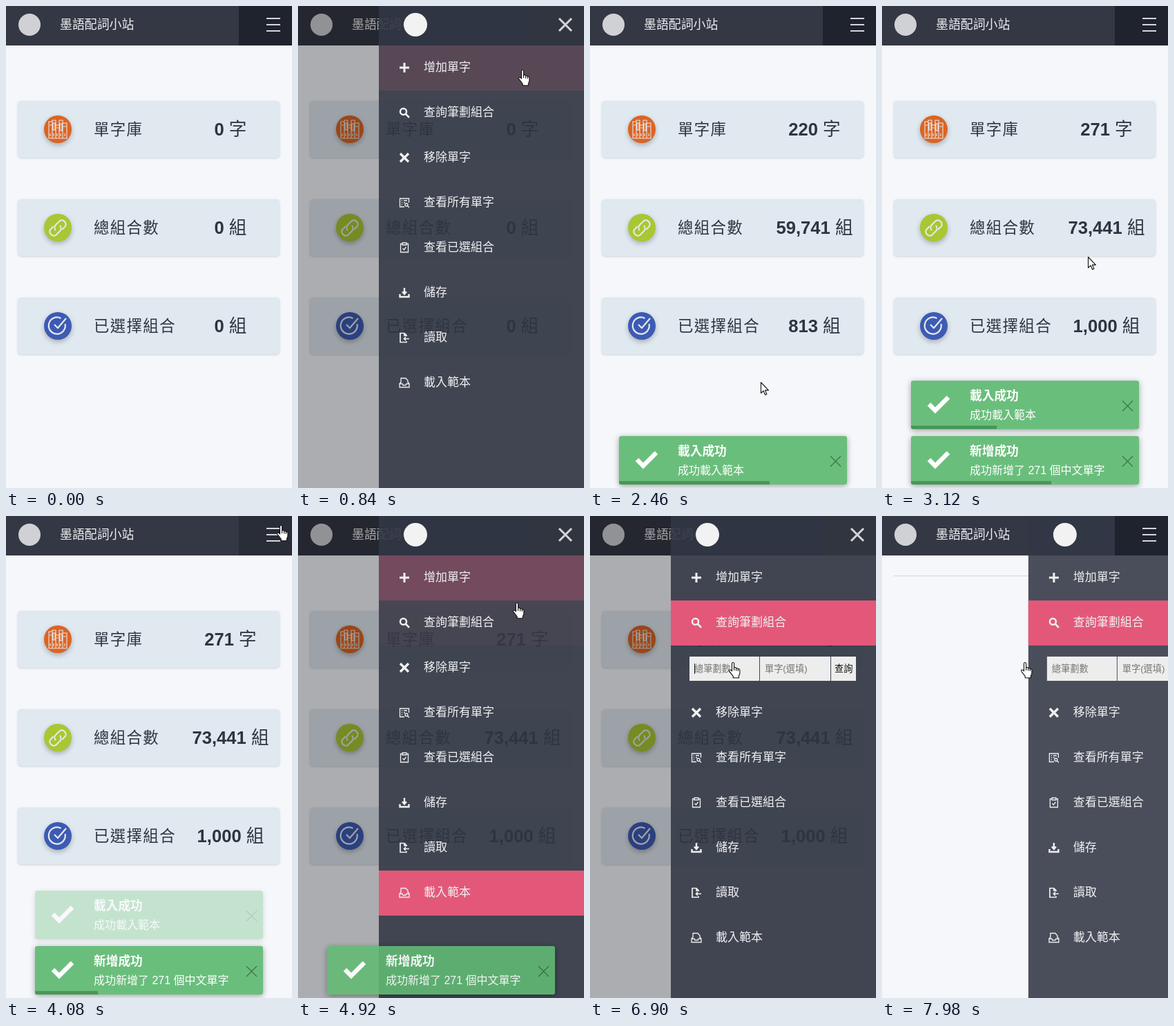
An HTML page for the animation above (8000 ms loop, 414 px wide and 696 px high).

```html
<!DOCTYPE html>
<html lang="zh-Hant">
<head>
<meta charset="utf-8">
<style>
html, body { margin: 0; width: 100%; height: 100%; overflow: hidden; background: #f5f7fb; }
body { font-family: "Liberation Sans", "Noto Sans CJK TC", sans-serif; }
#stage { position: absolute; left: 0; top: 0; width: 414px; height: 696px; overflow: hidden; }
#stage div, #stage svg { position: absolute; box-sizing: border-box; white-space: nowrap; }
svg { fill: none; overflow: visible; }
#header { width: 414px; height: 57px; background: #343844; }
#title { left: 78px; line-height: 54px; font-size: 17.9px; font-weight: 300; color: #f0f0f2; }
.dot { border-radius: 50%; }
.card { left: 17px; width: 379px; height: 82px; border-radius: 5px; background: #e0e8f0; box-shadow: 0 1px 3px rgba(60,80,100,.22); color: #2e3440; line-height: 83px; }
.badge { left: 38px; top: 21px; width: 40px; height: 40px; border-radius: 50%; box-shadow: 0 3px 7px rgba(0,0,0,.25); }
.badge svg { left: 0; top: 0; stroke: #e6eaee; }
.label { left: 110px; font-size: 22.4px; letter-spacing: 1.4px; font-weight: 500; }
.value { left: 207px; width: 202px; text-align: center; font-size: 25.6px; }
#rule { left: 17px; top: 86px; width: 397px; height: 1px; background: #d3d6db; }
#shade { width: 414px; height: 696px; background: rgba(0,0,0,.3); }
#menu { left: 117px; width: 297px; height: 696px; background: rgba(50,55,69,.88); color: #f0f0f2; }
.item { left: 0; width: 297px; height: 65px; line-height: 63px; padding-left: 65px; font-size: 17px; }
.item svg { left: 29px; top: 24px; stroke: #f0f0f2; stroke-width: 1.3; }
#form { left: 0; top: 187px; width: 297px; overflow: hidden; }
.field { top: 16px; height: 35px; line-height: 35px; padding-left: 7px; font-size: 13.2px; background: #ededed; color: #777; }
#caret { top: 26px; width: 1px; height: 15px; background: #111; }
#button { left: 337px; width: 77px; height: 57px; }
#button svg { left: 40px; top: 17px; stroke: #d4d6da; }
.toast { left: 42px; top: 621px; width: 330px; height: 70px; border-radius: 3px; overflow: hidden; background: rgba(98,187,116,.94); color: #fff; box-shadow: 0 2px 9px rgba(0,0,0,.36); }
.toast b, .toast span { position: absolute; left: 85px; }
.toast b { top: 10px; line-height: 24px; font-size: 17.7px; }
.toast span { top: 39px; line-height: 22px; font-size: 16px; }
.bar { left: 0; bottom: 0; height: 5px; background: #479857; }
#cursor { left: 0; top: 0; }
#cursor svg { fill: #fff; stroke: #111; stroke-width: 1.1; stroke-linejoin: round; }
</style>
</head>
<body>
<div id="stage">
  <div id="header">
    <div class="dot" style="left:18px;top:11px;width:32px;height:32px;background:#cfd1d5"></div>
    <div id="title">墨語配詞小站</div>
  </div>
  <div id="cards"></div>
  <div id="rule"></div>
  <div id="shade"></div>
  <div id="menu">
    <div class="dot" style="left:36px;top:10px;width:34px;height:34px;background:#f2f2f3"></div>
    <div id="items"></div>
    <div id="form">
      <div class="field" id="strokes" style="left:27px;width:101px"></div>
      <div class="field" style="left:129px;width:102px">單字(選填)</div>
      <div class="field" style="left:232px;width:36px;padding-left:5px;color:#111">查詢</div>
      <div id="caret"></div>
    </div>
  </div>
  <div id="button"><svg width="20" height="20"><path id="glyph"/></svg></div>
  <div id="toasts"></div>
  <div id="cursor">
    <svg id="arrow" width="12" height="20"><path d="M.5 .5V16l3.6-3.3 2.5 5.8 2.3-1-2.5-5.6h5z"/></svg>
    <svg id="hand" width="18" height="24" style="left:-6px;top:-1px"><path d="M4.5 13V2.2Q4.5.5 6 .5T7.6 2.2V8q2.6-1 3 .9 2.2-.7 2.7 1.1 2.5-.6 2.6 1.7v4q0 2-1.5 4v3H6.2v-2.4Q4 17.5 1 13.6q-1-1.6.2-2.4T4.5 13zM7.6 8v4M10.6 9v3.5M13.3 10v3"/></svg>
  </div>
</div>
<script>
const $ = id => document.getElementById(id);
const clamp = v => Math.max(0, Math.min(1, v));
const span = (t, start, length) => clamp((t - start) / length);
const easeOut = p => 1 - (1 - p) ** 2;
const swing = p => .5 - Math.cos(Math.PI * p) / 2;
const between = (t, a, b) => t >= a && t < b;
const show = (el, on) => el.style.display = on ? 'block' : 'none';

function add(parent, cls, html) {
  const el = document.createElement('div');
  el.className = cls;
  el.innerHTML = html;
  parent.append(el);
  return el;
}

const books = 'M7 9h5v24H7zM12 7h5v26h-5zM17 14h5v19h-5zM22 7h5v26h-5zM27 11h6v22h-6zM8 14h3M13 11h3v10h-3zM18 18h3M23 12h3v10h-3zM28 16h4M9 26v4M14 26v4M19 26v4M24 26v4M30 26v4';
const link = 'M17 24a6 6 0 0 1 0-8l6-6a6 6 0 0 1 8 8l-5 5M23 17a6 6 0 0 1 0 8l-6 6a6 6 0 0 1-8-8l5-5';
const tick = 'M30.5 17a12 12 0 1 1-6-8M15 18l5 5L32 9';
const cards = [
  ['單字庫', '#dc6423', books, 1.1, 271, '字'],
  ['總組合數', '#a9c734', link, 2, 73441, '組'],
  ['已選擇組合', '#3d5bb4', tick, 2.2, 1000, '組']
].map(([label, color, path, weight, total, unit], i) => {
  const card = add($('cards'), 'card', `<div class="badge" style="background:${color}">
    <svg width="40" height="40" stroke-width="${weight}"><path d="${path}"/></svg></div>
    <div class="label">${label}</div><div class="value"><b></b> ${unit}</div>`);
  card.style.top = 137 + 142 * i + 'px';
  return { number: card.querySelector('b'), total };
});

const items = [
  ['增加單字', 'M8 1v14M1 8h14', 3],
  ['查詢筆劃組合', 'M11 6.5a4.5 4.5 0 1 1-9 0a4.5 4.5 0 0 1 9 0M10 10l5 5', 2.5],
  ['移除單字', 'M2 2l12 12M14 2L2 14', 3.4],
  ['查看所有單字', 'M8 14H1.5V2h13v6M4 5h1M7 5h5M4 8h1M7 8h2M4 11h1M13 11a2 2 0 1 1-4 0a2 2 0 0 1 4 0M12.5 12.5L15 15'],
  ['查看已選組合', 'M5 2.5H2.5v12h11v-12H11M5 1h6v3H5zM5.5 9l2 2 3-4'],
  ['儲存', 'M8 1v8M5 6.5L8 10l3-3.5M1.5 10v4h13v-4', 2.4],
  ['讀取', 'M11 6V4.5L8 1.5H2v13h9V13M8 1.5V5h3M15 9.5H8M10 7L7.5 9.5 10 12', 1.7],
  ['載入範本', 'M3 8V1.5h7L13 5v3M1 9.5h4l1 2h4l1-2h4v5H1zM1 9.5L3 7M15 9.5L13 7']
].map(([text, path, weight = 1.3]) => add($('items'), 'item',
  `<svg width="16" height="16" style="stroke-width:${weight}"><path d="${path}"/></svg>${text}`));

const toasts = [
  { title: '載入成功', text: '成功載入範本', start: 2100, end: 4000, rate: .66 / 1540, fade: 3960, fadeLength: 185 },
  { title: '新增成功', text: '成功新增了 271 個中文單字', start: 2530, end: 4860, rate: .276 / 780, fade: 4890, fadeLength: 500 }
];
for (const toast of toasts) {
  toast.el = add($('toasts'), 'toast', `<svg width="330" height="70" stroke="#fff">
    <path d="M26 34l9 9 19-19" stroke-width="6.5"/>
    <path d="M306 29l15 15M321 29l-15 15" stroke="rgba(0,50,15,.5)" stroke-width="1.2"/></svg>
    <b>${toast.title}</b><span>${toast.text}</span><div class="bar"></div>`);
  toast.bar = toast.el.querySelector('.bar');
}

// time, x, y of the pointer tip
const path = [
  [120, 408, 150], [300, 390, 28], [600, 390, 28], [900, 318, 100], [1400, 256, 520], [1740, 247, 544],
  [2040, 247, 544], [2100, 247, 543], [2760, 247, 543], [3660, 396, 18], [3780, 398, 14], [4380, 398, 14],
  [4860, 321, 117], [4920, 317, 126], [5100, 295, 156], [5700, 295, 156], [6060, 207, 212]
];
function pointer(t) {
  const i = path.findIndex(p => p[0] > t);
  if (i < 0) return path[path.length - 1].slice(1);
  if (!i) return path[0].slice(1);
  const [a, b] = [path[i - 1], path[i]];
  const p = swing(span(t, a[0], b[0] - a[0]));
  return [a[1] + (b[1] - a[1]) * p, a[2] + (b[2] - a[2]) * p];
}

const opens = [[420, 2060], [4200, 7910]];
const isOpen = t => opens.some(([a, b]) => between(t, a, b));
function menuShift(t) {
  const [a, b] = t < 4000 ? opens[0] : opens[1];
  return 297 * (1 - easeOut(span(t, a, 400)) + easeOut(span(t, b, 400)));
}
const formHeight = t => 65 * swing(span(t, 5418, 400));
const itemTop = (i, t) => 57 + 65 * i + (i > 1 ? formHeight(t) : 0);

// Averaging recent hover gives a 300 ms linear fade.
function hover(i, t) {
  let hits = 0;
  for (let k = 0; k < 15; k++) {
    const past = t - 20 * k, [x, y] = pointer(past), top = itemTop(i, past);
    if (isOpen(past) && x > 117 + menuShift(past) && y >= top && y < top + 65) hits++;
  }
  return .36 * hits / 15;
}
function active(i, t) {
  if (i === 7) return span(t, 2040, 120) * (1 - span(t, 5418, 300));
  return i === 1 ? span(t, 5418, 200) : 0;
}

function draw(t) {
  const open = isOpen(t), results = t >= 7910, [x, y] = pointer(t);

  const count = easeOut(span(t, 2119.145, 600));
  for (const { number, total } of cards) number.textContent = Math.round(total * count).toLocaleString('en-US');
  show($('cards'), !results);
  show($('rule'), results);
  show($('shade'), open);

  $('menu').style.transform = `translateX(${menuShift(t)}px)`;
  items.forEach((item, i) => {
    item.style.top = itemTop(i, t) + 'px';
    item.style.background = `rgba(227,88,121,${Math.max(hover(i, t), active(i, t))})`;
  });

  const typed = results ? '' : t >= 7500 ? '30' : t >= 7200 ? '3' : '';
  $('form').style.height = formHeight(t) + 'px';
  $('strokes').textContent = typed || '總筆劃數';
  $('strokes').style.color = typed ? '#111' : '#777';
  $('caret').style.left = 34 + 7.34 * typed.length + 'px';
  show($('caret'), between(t, 6000, 6420) || between(t, 6900, 7910));

  const over = !open && x > 337 && y < 57 && between(t, 120, 7900);
  $('button').style.background = open ? '#31353f' : over ? '#282d38' : '#1e232e';
  $('glyph').setAttribute('d', open ? 'M1 1l18 18M19 1L1 19' : 'M0 1h20M0 10h20M0 19h20');
  $('glyph').setAttribute('stroke-width', open ? 3 : 2);

  toasts.forEach((toast, i) => {
    const enter = easeOut(span(t, toast.start, 300));
    const lift = i ? 0 : 80 * easeOut(span(t, toasts[1].start, 300));
    toast.el.style.opacity = enter * (1 - span(t, toast.fade, toast.fadeLength));
    toast.el.style.transform = `translateY(${40 * (1 - enter) - lift}px)`;
    toast.bar.style.width = 330 * clamp((toast.end - t) * toast.rate) + 'px';
  });

  const arrow = t < 240 || between(t, 2100, 3700);
  show($('cursor'), t >= 120);
  show($('arrow'), arrow);
  show($('hand'), !arrow);
  $('cursor').style.transform = `translate(${Math.round(x)}px,${Math.round(y)}px)`;
}

const begin = performance.now(), step = 60;
function frame() {
  const t = (performance.now() - begin) % 8000;
  draw(Math.floor(t / step) * step);
  requestAnimationFrame(frame);
}
frame();
</script>
</body>
</html>
```
